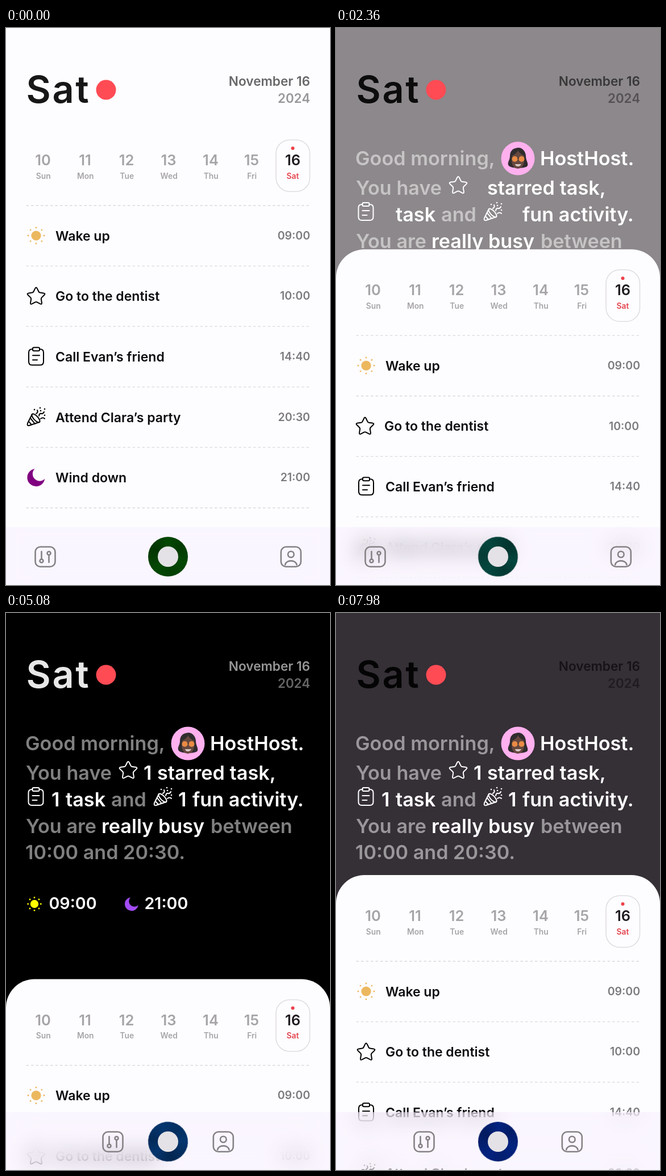
Write an HTML page that moves like this. It is 570 by 982 pixels and loops after 8000 ms.

```html
<!DOCTYPE html>
<html lang="en">
<head>
<meta charset="utf-8">
<title>Day planner</title>
<style>
  html, body { margin: 0; width: 100%; height: 100%; overflow: hidden; background: #fdfcff; }
  #stage { position: relative; width: 570px; height: 982px; overflow: hidden; background: #fdfcff; }
  #stage > div, #stage > svg { position: absolute; left: 0; top: 0; }
  svg { display: block; overflow: visible; font: 600 23px Inter, sans-serif; }
  #shade { width: 570px; height: 982px; }
  #sheet { width: 570px; height: 982px; }
  #paper { position: absolute; top: 161px; width: 570px; height: 982px; border-radius: 50px; background: #fdfcff; }
  #sheet svg { position: absolute; left: 0; top: 0; }
  #stage > #nav { top: 880px; width: 570px; height: 102px; background: rgba(244, 234, 254, .32);
    -webkit-backdrop-filter: blur(18px); backdrop-filter: blur(18px); }
  #stage > #ring { left: 250px; top: 897px; width: 70px; height: 70px; border-radius: 50%;
    background-image: conic-gradient(#0000, #0003 50deg, #0000 110deg, #0002 170deg, #0000 220deg, #0004 300deg, #0000); }
  #stage > #core { left: 267px; top: 914px; width: 36px; height: 36px; border-radius: 50%; background: #e4e2e6; }
  .line { fill: none; stroke: currentColor; stroke-width: 2; stroke-linecap: round; stroke-linejoin: round; }
  .navicon { fill: none; stroke: #858286; stroke-width: 2.6; stroke-linecap: round; }
</style>
</head>
<body>
<div id="stage">
  <div id="shade"></div>
  <svg id="head" width="570" height="982"></svg>
  <svg id="brief" width="570" height="982" color="#fff"></svg>
  <div id="sheet">
    <div id="paper"></div>
    <svg id="list" width="570" height="982"></svg>
  </div>
  <div id="nav"></div>
  <svg id="buttons" width="570" height="982">
    <g class="navicon" id="leftButton">
      <rect x="51.5" y="914.8" width="35" height="35" rx="9"/>
      <path d="M62.5 923V937M75.5 929V942"/>
      <circle cx="62.5" cy="939.5" r="3"/><circle cx="75.5" cy="926" r="3"/>
    </g>
    <g class="navicon" id="rightButton">
      <rect x="483.8" y="914.8" width="35" height="35" rx="9"/>
      <circle cx="501.3" cy="928" r="5.3"/>
      <path d="M491 946.5C493 937 509.6 937 511.6 946.5"/>
    </g>
  </svg>
  <div id="ring"></div>
  <div id="core"></div>
</div>
<script>
const $ = id => document.getElementById(id);
const LOOP = 8000;

// ---- drawing helpers ----
function text(x, y, size, str, { fill = 'currentColor', alpha = 1, anchor = 'start', spacing = 0 } = {}) {
  return `<text x="${x}" y="${y}" fill="${fill}" fill-opacity="${alpha}" text-anchor="${anchor}"
    style="font-size:${size}px;letter-spacing:${spacing}em">${str}</text>`;
}
const at = (x, y, shape) => `<g transform="translate(${x} ${y})">${shape}</g>`;
const circle = (x, y, r, fill) => `<circle cx="${x}" cy="${y}" r="${r}" fill="${fill}"/>`;

function sun(color, core, orbit, dot) {
  let out = circle(0, 0, core, color);
  for (let i = 0; i < 8; i++) {
    const a = i * Math.PI / 4;
    out += circle(orbit * Math.cos(a), orbit * Math.sin(a), dot, color);
  }
  return out;
}

function star() {
  const points = Array.from({ length: 10 }, (_, i) => {
    const r = i % 2 ? 9 : 18, a = i * Math.PI / 5;
    return [r * Math.sin(a), 1 - r * Math.cos(a)];
  });
  const mix = (p, q, f) => p.map((v, i) => (v + (q[i] - v) * f).toFixed(2)).join(' ');
  const d = points.map((p, i) => {
    const f = i % 2 ? .15 : .35;
    const before = points[(i + 9) % 10], after = points[(i + 1) % 10];
    return `${i ? 'L' : 'M'}${mix(p, before, f)}Q${p.join(' ')} ${mix(p, after, f)}`;
  }).join('');
  return `<path class="line" d="${d}Z"/>`;
}

const moon = (color, r) =>
  `<path transform="scale(${r})" fill="${color}" d="M-.16-.98A1 1 0 1 0 .98.16A.72.72 0 0 1-.16-.98Z"/>`;

const clipboard = `<g class="line"><path d="M-6-13H-7Q-13-13-13-7V9Q-13 15-7 15H7Q13 15 13 9V-7Q13-13 7-13H6"/>
  <rect x="-6" y="-16" width="12" height="6" rx="2"/><path d="M-6-2H6M-6 6H2"/></g>`;

const popper = `<g class="line"><path d="M-7-5L-15 11Q-16.5 16-12 15L6 9"/>
  <ellipse cx="-.5" cy="2" rx="3.8" ry="9.5" transform="rotate(-43 -.5 2)"/>
  <path d="M-10 2L-2 12M-13 8L-8 13.5M0-6Q4-8 2-12M5-2Q6-7 9-6T14-9M8 3Q12 0 15 3"/></g>` +
  [[-3, -13], [7, -16], [8, -11], [15, -14], [15, -3]].map(p => circle(...p, 1.3, 'currentColor')).join('');

const avatar = circle(0, 0, 29.5, '#ffb0ee') +
  `<path fill="#302c2e" d="M-4-18C6-22 14-13 14-4C14 4 20 10 16 14C10 18-10 18-16 13C-20 8-14 3-14-4C-14-12-10-17-4-18Z"/>
   <path fill="#66483f" d="M-10-5Q-3-8 0-14Q5-7 11-5V6Q9 18 0 18T-11 6Z"/>
   <path stroke="#3a2b28" stroke-width="1.5" d="M-10 0H11"/>` +
  circle(-5.5, 1, 5, '#e98b45') + circle(6.5, 1, 5, '#e98b45') +
  '<path fill="#d8c8c2" d="M-5 10H6Q4 14 0 14T-5 10Z"/>';

// ---- header ----
const right = { anchor: 'end' };
$('head').innerHTML =
  text(35.5, 132, 66.5, 'Sat', { alpha: .91, spacing: .04 }) +
  circle(176, 109, 17.5, '#ff4b54') +
  text(535, 102, 22.6, 'November 16', { ...right, alpha: .59 }) +
  text(535, 132, 22.3, '2024', { ...right, alpha: .4 });

// ---- briefing ----
const say = (x, y, str, alpha = 1) => text(x, y, 34.2, str, { alpha });
const dim = (x, y, str) => say(x, y, str, .5);
$('brief').innerHTML =
  dim(34, 242, 'Good morning,') + at(320, 230, avatar) + say(359, 242, 'HostHost.') +
  dim(35, 294, 'You have') + at(215, 277, star()) + say(266, 294, 'starred task,') +
  at(52.5, 324, clipboard) + say(105, 341, 'task') + dim(185, 341, 'and') +
  at(276, 324, popper) + say(328, 341, 'fun activity.') +
  dim(35, 388, 'You are') + say(168, 388, 'really busy') + dim(360, 388, 'between') +
  dim(34, 434, '10:00 and 20:30.') +
  at(50, 513, sun('#ffff00', 7.2, 11.3, 1.4)) + text(75.5, 522, 28.6, '09:00') +
  at(221, 513, moon('#a24bf5', 12)) + text(243.5, 522, 28.6, '21:00') +
  '<g id="counts">' + say(242, 294, '1') + say(80, 341, '1') + say(303, 341, '1') + '</g>';

// ---- sheet ----
const days = [['Sun', 65], ['Mon', 139], ['Tue', 212], ['Wed', 286], ['Thu', 360], ['Fri', 432], ['Sat', 504.5]];
const tasks = [
  ['Wake up', '09:00', sun('#ecb85f', 8.6, 14, 1.4)],
  ['Go to the dentist', '10:00', star()],
  ['Call Evan’s friend', '14:40', clipboard],
  ['Attend Clara’s party', '20:30', popper],
  ['Wind down', '21:00', moon('#800080', 15.5)]
];
const PITCH = 106.6;
const calendar = days.map(([name, x], i) => {
  const today = i === 6, anchor = 'middle';
  return text(x, 242.3, 25.5, 10 + i, { anchor, fill: today ? '#1f1b1f' : '#a6a4a7' }) +
    text(x + (today ? 0 : .7), 265.5, 13.8, name, { anchor, fill: today ? '#e4434c' : '#a6a4a7' });
}).join('');
const rules = Array.from({ length: 6 }, (_, i) =>
  `<path d="M35.5 ${313 + i * PITCH}H535" stroke="#dcd9d9" stroke-width="1.3" stroke-dasharray="4.5 4"/>`).join('');
const rows = tasks.map(([name, time, icon], i) => {
  const y = 366 + i * PITCH;
  return `<g id="row${i}">` + at(53, y, icon) + text(87, y + 8.7, 23, name, { fill: '#0d0b0e' }) +
    text(535, y + 6.8, 19.5, time, { ...right, fill: '#7c7a7e' }) + '</g>';
}).join('');
$('list').innerHTML = calendar + rules + rows +
  '<rect x="475" y="197.3" width="59.5" height="91" rx="24" fill="none" stroke="#dad8de" stroke-width="1.3"/>' +
  circle(504.5, 212, 3, '#ee4049');

// ---- motion: rows of [ms, value, easing to the next row] ----
function play(id, prop, steps, format = v => v) {
  const last = steps[steps.length - 1];
  const table = [[0, steps[0][1]], ...steps, [LOOP, last[1]]];
  $(id).animate(
    table.map(([ms, value, easing = 'linear']) => ({ offset: ms / LOOP, [prop]: format(value), easing })),
    { duration: LOOP, iterations: Infinity });
}
const px = axis => v => `translate${axis}(${v}px)`;
const pull = 'cubic-bezier(.5, 0, .8, .55)';
const settle = 'cubic-bezier(.14, .6, .3, 1)';
const release = 'cubic-bezier(.45, 0, .8, .6)';

play('sheet', 'transform', [[2000, 0, pull], [2360, 228, 'cubic-bezier(.2, .4, .5, .9)'], [2780, 465, settle],
  [3300, 484.5], [7700, 484.5, release], [7980, 301]], px('Y'));
play('shade', 'backgroundColor', [[2000, '#fdfcff', pull], [2360, '#8c888b', 'ease-out'],
  [2780, '#1f1b1d', 'ease-out'], [3450, '#000'], [7700, '#000', release], [7980, '#352f36']]);
play('head', 'color', [[2420, '#000'], [2600, '#fff'], [7700, '#fff'], [7850, '#000']]);

const slide = [[2380, 0, 'cubic-bezier(.3, .3, .5, .9)'], [2780, 104, 'ease-out'], [3250, 119],
  [7700, 119, release], [7980, 86]];
play('leftButton', 'transform', slide, px('X'));
play('rightButton', 'transform', slide, v => px('X')(-v));

play('row1', 'transform', [[2080, 0], [2360, -2], [2520, 0]], px('X'));

const arrive = [[3380, 0], [3620, .62, 'ease-out'], [3950, 1]];
play('counts', 'opacity', arrive);
play('counts', 'transform', arrive, v => `translateY(${(v - 1) * 25}px)`);

play('ring', 'backgroundColor', [[0, '#044804'], [1280, '#044717'], [2360, '#04463e'], [2780, '#04454f'],
  [3620, '#043d66'], [6860, '#032c78'], [7980, '#032380']]);
play('ring', 'transform', [[0, 0], [LOOP - 1, 360]], v => `rotate(${v}deg)`);
</script>
</body>
</html>
```
